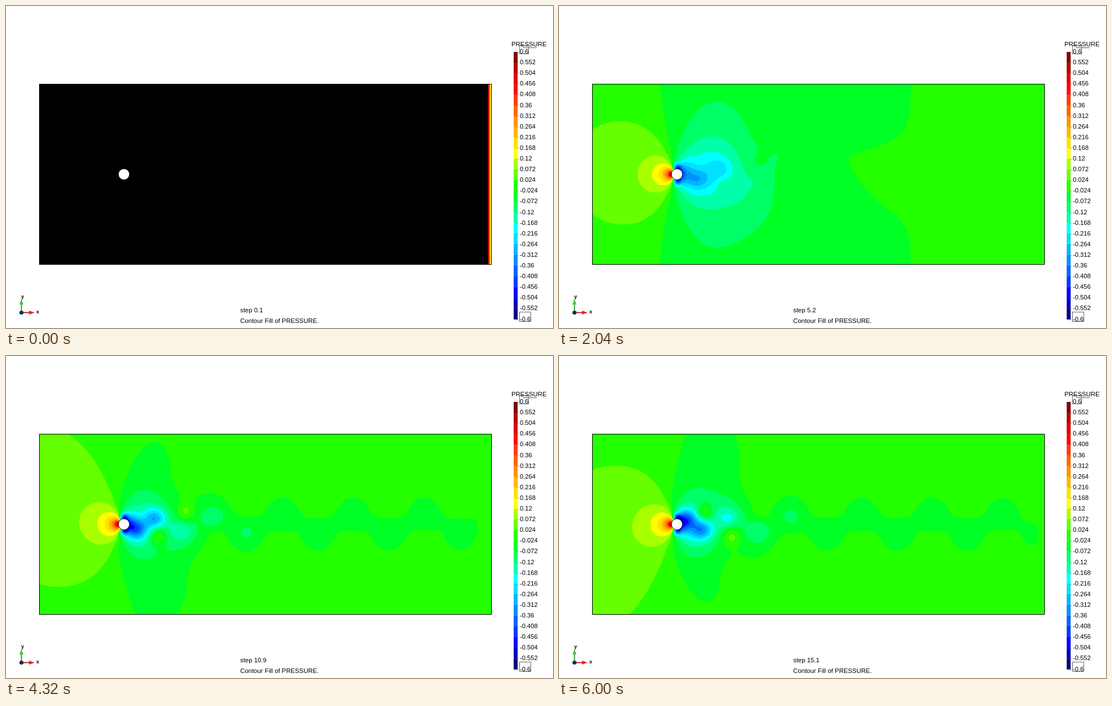
An HTML page with a canvas for the animation above (6.04 s loop, 974 by 575 pixels).

```html
<!DOCTYPE html>
<html lang="en">
<head>
<meta charset="utf-8">
<title>Pressure contours</title>
<style>
  html, body { margin: 0; width: 100%; height: 100%; overflow: hidden; background: #fff; }
  canvas, svg { position: absolute; left: 0; top: 0; }
  canvas { left: 60px; top: 140px; }
  text { font-family: "Liberation Sans", Arial, sans-serif; font-size: 11.4px; fill: #000; }
  .tick { font-size: 11.2px; }
  .axis { font-size: 9px; font-weight: bold; }
</style>
</head>
<body>
<canvas id="field" width="804" height="321"></canvas>
<svg id="overlay" width="974" height="575" viewBox="0 0 974 575">
  <rect x="59.5" y="139.5" width="805" height="322" fill="none" stroke="#000" stroke-width="1"/>
  <circle cx="210" cy="300.5" r="9.8" fill="#fff" stroke="#000" stroke-width=".8"/>
  <g id="legend"></g>
  <text x="900" y="72">PRESSURE</text>
  <path d="M920 74.5H945" stroke="#555"/>
  <rect x="914.5" y="70.5" width="16" height="15" fill="none" stroke="#666"/>
  <rect x="914.5" y="546.5" width="20" height="17" fill="none" stroke="#666"/>
  <path d="M27.5 547V532" stroke="#2fa52f" stroke-width="2"/>
  <path d="M27.5 523L31 533H24Z" fill="#45c83c"/>
  <path d="M28 547.5H42" stroke="#c62020" stroke-width="2"/>
  <path d="M51 547.5L41 544V551Z" fill="#e02a22"/>
  <circle cx="27.5" cy="547.5" r="3.6" fill="#12324a"/>
  <text class="axis" x="27" y="522">y</text>
  <text class="axis" x="54" y="549">x</text>
  <text id="step" x="417" y="547"></text>
  <text x="417" y="566">Contour Fill of PRESSURE.</text>
</svg>
<script>
const FRAME = 40, FRAMES = 151;
const W = 804, H = 321, X0 = 60, Y0 = 140, MID = 300.5;
const HALF = 0.479, LAST_BIRTH = 14.621;   // half shedding period, reference birth

const COLORS = ("800000 b00000 e00000 ff0000 ff3b00 ff6600 ff9100 ffb700 ffe000 ffff00 a8ff00 66ff00 " +
  "24ff00 00ff24 00ff66 00ffa8 00ffff 00e0ff 00b7ff 0091ff 0066ff 003bff 0000ff 0000c0 000080").split(" ");
const PALETTE = COLORS.map(c => {
  const n = parseInt(c, 16);
  return (0xff000000 | (n & 255) << 16 | (n & 0xff00) | n >> 16) >>> 0;
});
const BLACK = 0xff000000;

// time, outer centre, width, depth, 1/height, lobe depth, far bump, wake centre, size, depth, mean
const KEYS = [
  [0.2, 290, 110, .045, 0, .02, 0, 240, 20, .05, -.003],
  [3.6, 340, 170, .045, 0, .06, .036, 268, 25, .14, -.003],
  [5.2, 390, 215, .042, 0, .07, .018, 268, 30, .08, -.003],
  [7.8, 365, 160, .037, 0, .012, 0, 250, 40, .07, .001],
  [9.7, 275, 70, .04, .0057, 0, 0, 245, 40, .06, .006]
];
// vortex path and strengths by age in half periods
const PATH = [206, 226, 254, 302, 356, 414];
const CORE = [0, .20, .20, .075, .035, .02, .008, 0];
const BROAD = [0, 0, .01, .05, .066, .066, .066, .065, .064, .062, .06, .056, .052];
const PATCH = [0, 0, .13, .10, .03, 0];

const clamp = (v, a, b) => Math.min(b, Math.max(a, v));
const sample = (list, u) => {
  const i = clamp(Math.floor(u), 0, list.length - 2);
  return list[i] + (list[i + 1] - list[i]) * clamp(u - i, 0, 1);
};
const pathX = u => u < 5 ? sample(PATH, u) : 414 + 62.5 * (u - 5);

function keyAt(t) {
  let i = 0;
  while (i < KEYS.length - 2 && t > KEYS[i + 1][0]) i++;
  const a = KEYS[i], b = KEYS[i + 1];
  const f = clamp((t - a[0]) / (b[0] - a[0]), 0, 1);
  return a.map((v, k) => v + (b[k] - v) * f);
}

const ctx = document.getElementById("field").getContext("2d");
const image = ctx.createImageData(W, H);
const pixels = new Uint32Array(image.data.buffer);
const wake = new Float32Array(W * H), front = new Float32Array(W * H), lee = new Float32Array(W * H);
const ex = new Float32Array(W);
const meanX = new Float32Array(W), swayX = new Float32Array(W), outlet = new Float32Array(W);

function gauss(cx, cy, sx, sy, amp) {
  const x1 = Math.floor(clamp(cx - 3.5 * sx - X0, 0, W)), x2 = Math.ceil(clamp(cx + 3.5 * sx - X0, 0, W));
  const y1 = Math.floor(clamp(cy - 3.5 * sy - Y0, 0, H)), y2 = Math.ceil(clamp(cy + 3.5 * sy - Y0, 0, H));
  const bell = (d, s) => Math.exp(-d * d / (2 * s * s));
  for (let i = x1; i < x2; i++) ex[i] = amp * bell(i + X0 + .5 - cx, sx);
  for (let j = y1; j < y2; j++) {
    const ey = bell(j + Y0 + .5 - cy, sy);
    for (let i = x1, k = j * W + x1; i < x2; i++, k++) wake[k] += ex[i] * ey;
  }
}

function prepare() {
  for (let i = 0; i < W; i++) {
    const x = i + X0 + .5;
    meanX[i] = clamp((864 - x) / 660, 0, 1);
    swayX[i] = 1 / (1 + Math.exp((x - 380) / 50));
    outlet[i] = 1 - Math.exp((x - 864) / 15);
    for (let j = 0; j < H; j++) {
      const dx = x - 206, dy = j + Y0 + .5 - MID, r2 = dx * dx + dy * dy;
      const fade = dx > 0 ? Math.exp(-((dx / 70) ** 2)) : 1;
      front[j * W + i] = -5 * dx / (r2 + 16) * fade;
      // the wake only acts behind a fan of rays from the cylinder
      lee[j * W + i] = 1 / (1 + Math.exp(-(dx / Math.sqrt(r2) + .33) / .07));
    }
  }
}

function vortices(t) {
  for (let j = -1; j <= 25; j++) {
    const birth = LAST_BIRTH - HALF * j, u = (t - birth) / HALF;
    if (u <= 0) continue;
    const side = j % 2 ? 1 : -1;
    const early = clamp((5.5 - birth) / 2, 0, 1);
    const sharp = clamp((birth - 2.5) / 5, 0, 1), wide = clamp((birth - 1.7) / 3.5, 0, 1);
    const x = pathX(u) + 43 * Math.exp(-.8 * (birth - 3)) * Math.min(1, u / 1.5);
    if (x > 960) continue;
    const size = 24 + 14 * early, near = MID + side * Math.min(11, 8 + u);
    const core = sample(CORE, u) * sharp, broad = sample(BROAD, u) * wide, patch = sample(PATCH, u) * sharp;
    if (core) gauss(x, near, 13, 12, -core);
    if (broad) {
      gauss(x, MID + side * (18 + 24 * early), size, size, -broad);
      gauss(x, MID - side * 62, 28, 36, broad * .3);
    }
    if (patch) gauss(x + 5, MID - side * 21, 11, 12, patch);
  }
}

function solve(t) {
  const [, cx, sx, depth, invH, lobe, bump, wx, ws, wd] = keyAt(t);
  wake.fill(0);
  gauss(cx, MID, sx, invH ? 1 / invH : 1e5, -depth);
  if (lobe) gauss(286, MID, 53, 95, -lobe);
  if (bump) gauss(cx + 130, 306, 80, 45, bump);
  gauss(wx, MID, ws, ws, -wd);
  for (const s of [-1, 1]) gauss(210, MID + 12 * s, 5, 5, -.25);
  vortices(t);
}

const colour = p => {
  const band = Math.floor((.6 - p) / .048);
  return band < 0 ? BLACK : PALETTE[Math.min(band, 24)];
};

function paintStart() {
  for (let k = 0; k < W * H; k++) pixels[k] = colour(.08 + .09 * (W - k % W - .5));
}

function paintFlow(t) {
  solve(t);
  const mean = keyAt(t)[10];
  const sway = .006 * Math.cos(Math.PI * (t - 15.1) / HALF) * clamp((t - 4) / 5, 0, 1);
  for (let j = 0, k = 0; j < H; j++) {
    const tilt = sway * Math.tanh((j + Y0 + .5 - MID) / 50);
    for (let i = 0; i < W; i++, k++) {
      const p = front[k] + mean * meanX[i] + tilt * swayX[i] + wake[k] * lee[k];
      pixels[k] = colour(p * outlet[i]);
    }
  }
}

function paint(frame) {
  const t = (frame + 1) / 10;
  if (frame) paintFlow(t);
  else paintStart();
  ctx.putImageData(image, 0, 0);
  document.getElementById("step").textContent = "step " + t;
}

function legend() {
  const pitch = 477.5 / 25;
  let out = "";
  for (let i = 0; i <= 25; i++) {
    const y = 82 + i * pitch, label = +(0.6 - i * .048).toFixed(3);
    if (i < 25) out += `<rect x="904" y="${y}" width="7" height="${pitch + .3}" fill="#${COLORS[i]}"/>`;
    out += `<path d="M910 ${Math.round(y) + .5}h3" stroke="#777" stroke-width=".7"/>`;
    out += `<text class="tick" x="915" y="${Math.round(y + 3)}">${label}</text>`;
  }
  document.getElementById("legend").innerHTML = out;
}

prepare();
legend();
let shown = -1;
const start = performance.now();
function tick() {
  const frame = Math.floor(Math.max(0, performance.now() - start) / FRAME) % FRAMES;
  if (frame !== shown) paint(shown = frame);
  requestAnimationFrame(tick);
}
tick();
</script>
</body>
</html>
```
